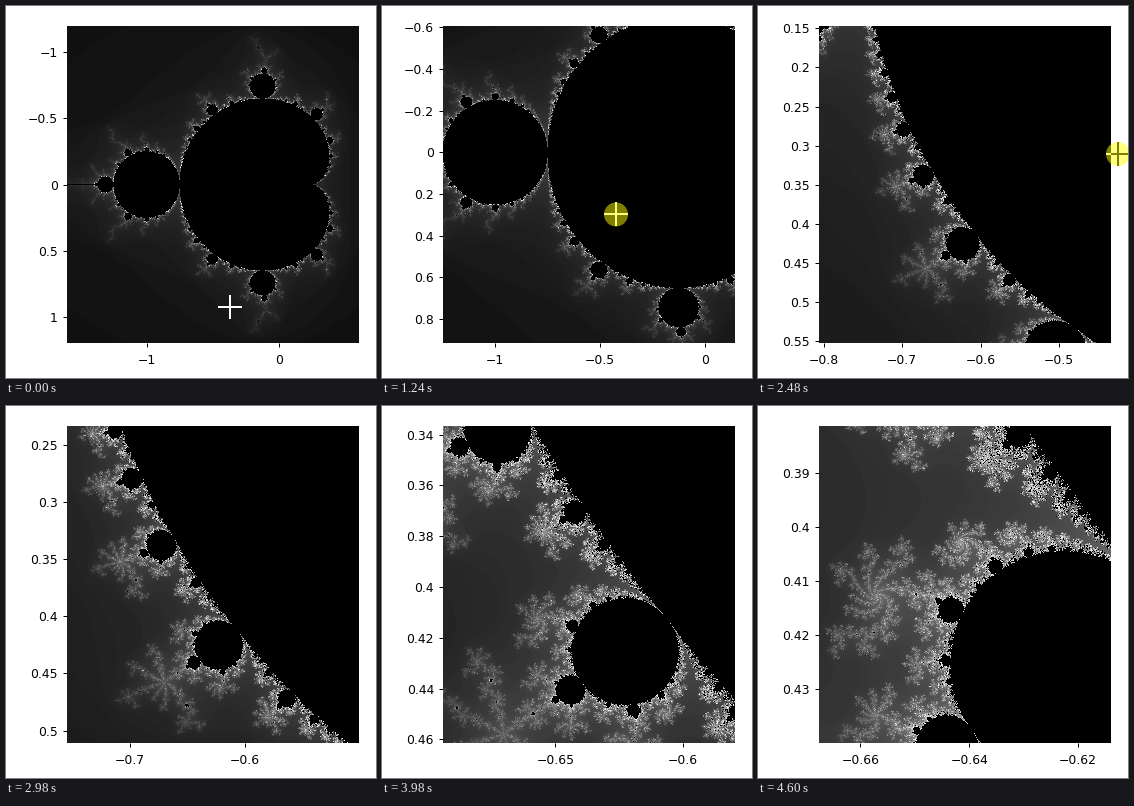
A matplotlib script that plays this animation: 370x372 px, repeating every 4.72 s.

```python
import math

import matplotlib.pyplot as plt
import numpy as np
from matplotlib.animation import FuncAnimation
from matplotlib.patches import Circle

W, H, DPI = 370, 372, 100
LOOP, TICK, POSES = 4720, 40, 38              # each pose is held for about 3 ticks
FRAMES = LOOP // TICK
LEFT, TOP, PW, PH = 61, 20, 292, 317          # plot box in pixels
X0, X1, Y0, Y1 = -1.6, 0.6, -1.2, 1.2         # opening view
AX, AY = -0.6443, 0.4209                      # fixed point of the zoom
MAX_ITER, GAMMA = 500, 0.5
CYCLE = 84                                    # holds the periods of most discs
PT = 72 / DPI

# keyframes by pose: log of the zoom, and the pointer position
ZOOM_T = [4, 7, 14, 20, 28, 32, 37]
ZOOM = [0, 0.157, 0.856, 1.778, 2.540, 2.957, 3.713]
PTR_T = [0, 3, 4, 7, 14, 20, 23]
PTR_X = [224, 187, 187, 204, 274, 360, 398]
PTR_Y = [301, 234, 234, 226, 185, 148, 132]
PRESS = 5
ARM = 12


def view(pose):
    s = math.exp(-np.interp(pose, ZOOM_T, ZOOM))
    return (AX + (X0 - AX) * s, AX + (X1 - AX) * s,
            AY + (Y0 - AY) * s, AY + (Y1 - AY) * s)


def mandelbrot(x0, x1, y0, y1):
    """Escape counts as gray levels; the inside is black."""
    x = x0 + (np.arange(PW) + 0.5) * (x1 - x0) / PW
    y = y0 + (np.arange(PH) + 0.5) * (y1 - y0) / PH
    c = (x[None, :] + 1j * y[:, None]).ravel()
    count = np.zeros(c.size)

    # leave out the main cardioid and the large disc
    q = abs(c - 0.25) ** 2
    inside = q * (q + c.real - 0.25) <= c.imag ** 2 / 4
    inside |= abs(c + 1) <= 0.25
    idx = np.flatnonzero(~inside)
    k = c[idx]
    z = np.zeros_like(k)
    old = z
    for n in range(1, MAX_ITER):
        z = z * z + k
        out = z.real ** 2 + z.imag ** 2 > 4
        if out.any():
            count[idx[out]] = n
            keep = ~out
            idx, z, k, old = idx[keep], z[keep], k[keep], old[keep]
        if n % CYCLE == 0:
            # orbits that repeat never escape
            keep = abs(z - old) > 1e-7
            idx, z, k = idx[keep], z[keep], k[keep]
            old = z
        if not idx.size:
            break
    return 255 * (count.reshape(PH, PW) / MAX_ITER) ** GAMMA


def ticks(lo, hi, pixels, gap):
    """Round values at the smallest 1-2-5 step at least gap pixels wide."""
    need = gap * (hi - lo) / pixels
    base = 10 ** math.floor(math.log10(need))
    step = next(m * base for m in (1, 2, 5, 10) if m * base >= need)
    ks = range(math.ceil(lo / step), math.floor(hi / step) + 1)
    values = [round(j * step, 6) for j in ks]
    return values, [f"{v:g}".replace("-", "\u2212") for v in values]


plt.rcParams["font.family"] = "DejaVu Sans"
fig = plt.figure(figsize=(W / DPI, H / DPI), dpi=DPI, facecolor="white")


def overlay(z):
    a = fig.add_axes([0, 0, 1, 1], zorder=z)
    a.set(xlim=(0, W), ylim=(H, 0))
    a.axis("off")
    return a


under, over = overlay(-1), overlay(2)
ax = fig.add_axes([LEFT / W, 1 - (TOP + PH) / H, PW / W, PH / H], zorder=1)
ax.spines[:].set_visible(False)
ax.tick_params(length=4 * PT, width=PT, labelsize=12.4 * PT)
ax.tick_params(axis="x", pad=6.5 * PT)
ax.tick_params(axis="y", pad=5 * PT)
image = ax.imshow(np.zeros((PH, PW)), cmap="gray", vmin=0, vmax=255,
                  interpolation="nearest", aspect="auto")

# the cross is white on the plot and black on the page
style = dict(lw=2 * PT, solid_capstyle="butt")
dark, = under.plot([], [], color="black", **style)
light, = over.plot([], [], color="white", **style)
light.set_clip_box(ax.bbox)
press = over.add_patch(Circle((0, 0), ARM, fc="yellow", ec="none", alpha=0.5,
                              zorder=5))

levels = {}


def draw(i):
    pose = min((i + 1) * POSES // FRAMES, POSES - 1)
    x0, x1, y0, y1 = box = view(pose)
    if box not in levels:
        levels[box] = mandelbrot(*box)
    image.set_data(levels[box])
    image.set_extent((x0, x1, y1, y0))
    ax.set(xlim=(x0, x1), ylim=(y1, y0))
    ax.set_xticks(*ticks(x0, x1, PW, 72))
    ax.set_yticks(*ticks(y0, y1, PH, 32))

    px, py = np.interp(pose, PTR_T, PTR_X), np.interp(pose, PTR_T, PTR_Y)
    for line in (dark, light):
        line.set_data([px - ARM, px + ARM, np.nan, px, px],
                      [py, py, np.nan, py - ARM, py + ARM])
    press.center = px, py
    press.set_visible(pose >= PRESS)
    return image, dark, light, press


anim = FuncAnimation(fig, draw, frames=FRAMES, interval=TICK,
                     repeat=True, repeat_delay=0, blit=False)
plt.show()
```
